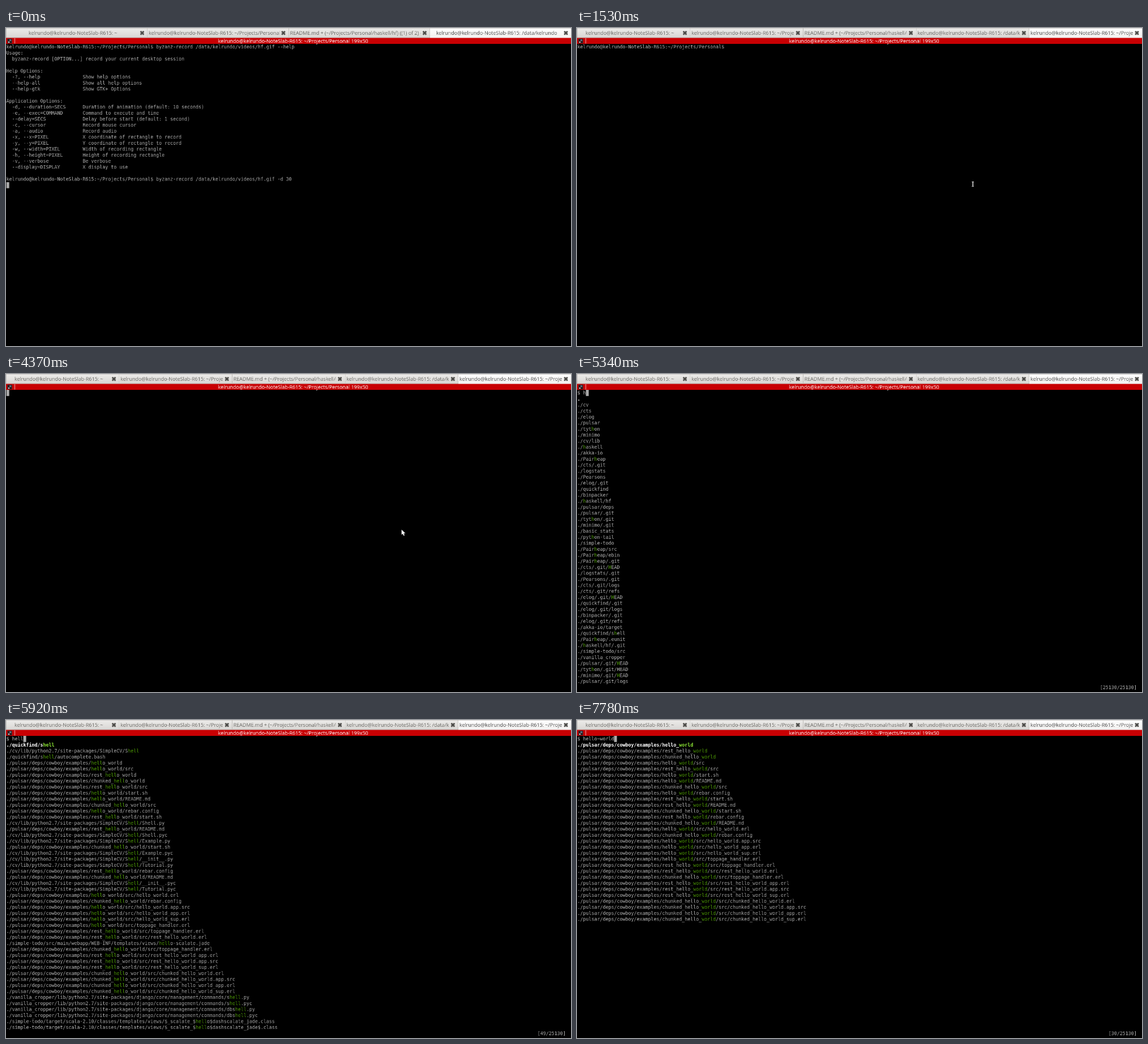
An HTML page with a canvas that plays this animation: 998x561 px, repeating every 8 s.

```html
<!DOCTYPE html>
<html lang="en">
<head>
<meta charset="utf-8">
<title>Terminal fuzzy finder</title>
<style>
  html, body { margin: 0; width: 100%; height: 100%; overflow: hidden; background: #000; }
  canvas { display: block; }
</style>
</head>
<body>
<canvas id="stage" width="998" height="561"></canvas>
<script>
const LOOP = 8000;
const SCALE = 998 / 1600;
const CELL_W = 8, CELL_H = 17, TERM_X = 1, TERM_Y = 45, COLS = 198;
const MONO = '13.33px "DejaVu Sans Mono", monospace';
const UI = '14.3px "Open Sans", sans-serif';
const GREY = '#aaaaaa', GREEN = '#4e9a06', LIME = '#8ae234', RED = '#c80003';

const view = document.getElementById('stage').getContext('2d');
const desk = document.createElement('canvas');
desk.width = 1600;
desk.height = 900;
const ctx = desk.getContext('2d');

const host = 'kelrundo@kelrundo-NoteSlab-R615:';
const prompt = host + '~/Projects/Personal$ ';
const record = prompt + 'byzanz-record /data/kelrundo/videos/hf.gif ';

const tabNames = [
  host + ' ~',
  host + ' ~/Projects/Personal',
  'README.md + (~/Projects/Personal/haskell/hf) ((1) of 2) - VIM',
  host + ' /data/kelrundo',
  host + ' ~/Projects/Personal'
];

const option = (flag, text) => ('  ' + flag).padEnd(27) + text;
const helpText = [
  record + '--help',
  'Usage:',
  '  byzanz-record [OPTION...] record your current desktop session',
  '',
  'Help Options:',
  option('-?, --help', 'Show help options'),
  option('--help-all', 'Show all help options'),
  option('--help-gtk', 'Show GTK+ Options'),
  '',
  'Application Options:',
  option('-d, --duration=SECS', 'Duration of animation (default: 10 seconds)'),
  option('-e, --exec=COMMAND', 'Command to execute and time'),
  option('--delay=SECS', 'Delay before start (default: 1 second)'),
  option('-c, --cursor', 'Record mouse cursor'),
  option('-a, --audio', 'Record audio'),
  option('-x, --x=PIXEL', 'X coordinate of rectangle to record'),
  option('-y, --y=PIXEL', 'Y coordinate of rectangle to record'),
  option('-w, --width=PIXEL', 'Width of recording rectangle'),
  option('-h, --height=PIXEL', 'Height of recording rectangle'),
  option('-v, --verbose', 'Be verbose'),
  option('--display=DISPLAY', 'X display to use'),
  '',
  record + '-d 30'
];

// Shorthand in the path lists: @ # % * ^ stand for common path parts.
const shorthand = {
  '@': 'pulsar/deps/cowboy/examples/',
  '#': 'cv/lib/python2.7/site-packages/SimpleCV/Shell',
  '%': 'vanilla_cropper/lib/python2.7/site-packages/django/core/management/commands/',
  '*': 'hello_world',
  '^': 'Pairheap',
  '!': '/.git/'
};
const paths = text => text.trim().split(/\s+/)
  .map(p => './' + p.replace(/[@#%*^!]/g, c => shorthand[c]));

const heList = paths(`
  ^ ^/src ^/ebin ^/.git cts!HEAD elog!HEAD pulsar/deps/simple_cache quickfind/shell
  ^/.eunit pulsar!HEAD tython!HEAD minimo!HEAD cts!branches elog!branches ^/README.md
  ^!info ^!logs ^!refs ^!HEAD logstats!HEAD Pearsons!HEAD cts!logs/HEAD cts!ORIG_HEAD
  quickfind!HEAD elog!logs/HEAD ^/.gitignore ^!hooks ^!index cts!FETCH_HEAD
  cts!refs/heads binpacker!HEAD elog!refs/heads pulsar/deps/pairheap pulsar!branches
  ^!config tython!branches minimo!branches haskell/hf!HEAD
  akka-io/target/scala-2.10/cache pulsar!logs/HEAD ^!objects ^/rebar.config
  basic_stats!HEAD python-tail!HEAD simple-todo!HEAD pulsar!refs/heads ^!branches
  logstats!branches`);

const hellList = paths(`
  quickfind/shell # quickfind/shell/autocomplete.bash
  @* @*/src @rest_* @chunked_* @rest_*/src @*/start.sh @*/README.md @chunked_*/src
  @*/rebar.config @rest_*/start.sh #/Shell.py @rest_*/README.md #/Shell.pyc
  #/Example.py @chunked_*/start.sh #/Example.pyc #/__init__.py #/Tutorial.py
  @rest_*/rebar.config @chunked_*/README.md #/__init__.pyc #/Tutorial.pyc
  @*/src/*.erl @chunked_*/rebar.config @*/src/*.app.src @*/src/*_app.erl
  @*/src/*_sup.erl @*/src/toppage_handler.erl @rest_*/src/toppage_handler.erl
  @rest_*/src/rest_*.erl
  simple-todo/src/main/webapp/WEB-INF/templates/views/hello-scalate.jade
  @chunked_*/src/toppage_handler.erl @rest_*/src/rest_*_app.erl
  @rest_*/src/rest_*.app.src @rest_*/src/rest_*_sup.erl
  @chunked_*/src/chunked_*.erl @chunked_*/src/chunked_*.app.src
  @chunked_*/src/chunked_*_app.erl @chunked_*/src/chunked_*_sup.erl
  %shell.py %shell.pyc %dbshell.py %dbshell.pyc
  simple-todo/target/scala-2.10/classes/templates/views/$_scalate_$hello$dashscalate_jade.class
  simple-todo/target/scala-2.10/classes/templates/views/$_scalate_$hello$dashscalate_jade$.class
  simple-todo/target/scala-2.10/src_managed/main/scalate/templates/views/hello-scalate_jade.scala`);

const helloList = hellList.filter(p => p.includes('hello'));
const worldList = helloList.filter(p => p.includes('world'));
worldList.splice(3, 0, worldList.splice(1, 1)[0]);

const parents = path => path.split('/').map((_, i, parts) => parts.slice(0, i + 1).join('/'));
const allList = [...new Set([...heList, ...hellList].flatMap(parents))]
  .sort((a, b) => a.length - b.length);
const hList = allList.filter(p => /h/i.test(p));

const scene = (start, props) => ({ start, newTab: true, lines: [], cursor: null, pointer: '', ...props });
const shell = (start, typed, pointer = '', blink = true) => {
  const line = prompt + typed;
  return scene(start, { lines: [line], cursor: blink ? [line.length, 0] : null, pointer });
};
const finder = (start, query, list, count, blink = true, pointer = '') => scene(start, {
  lines: ['$ ' + query], cursor: blink ? [query.length + 2, 0] : null, query, list, count, pointer
});

const command = 'find . | hf';
const keyTimes = [2010, 2090, 2180, 2260, 2420, 2510, 2670, 2930, 3070, 3450, 3550];

const scenes = [
  scene(0, { newTab: false, lines: helpText, cursor: [0, 23] }),
  scene(540, { newTab: false, lines: helpText }),
  scene(950, { cursor: [0, 0], pointer: 'arrow' }),
  scene(1040, { cursor: [0, 0], pointer: 'beam' }),
  shell(1090, '', 'beam'),
  shell(1530, '', 'beam', false),
  ...keyTimes.map((time, i) => shell(time, command.slice(0, i + 1))),
  shell(3700, command + ' '),
  shell(4080, command),
  scene(4290, { lines: [prompt + command], cursor: [0, 1] }),
  scene(4330, { cursor: [0, 0] }),
  scene(4370, { cursor: [0, 0], pointer: 'arrow' }),
  finder(4420, '', allList, 25130, true, 'beam'),
  finder(4830, '', allList, 25130, false, 'beam'),
  finder(5300, 'h', allList, 25130),
  finder(5350, 'h', hList, 1500),
  finder(5430, 'h', hList, 9500),
  finder(5710, 'he', hList, 9500),
  finder(5760, 'he', heList, 1500),
  finder(5810, 'hel', hellList, 57),
  finder(5920, 'hell', hellList, 49),
  finder(6070, 'hello', helloList, 34),
  finder(6590, 'hello', helloList, 34, false),
  finder(6880, 'hello~', helloList, 34),
  finder(7330, 'hello~w', helloList, 34),
  finder(7450, 'hello~wo', worldList, 30),
  finder(7560, 'hello~wor', worldList, 30),
  finder(7670, 'hello~worl', worldList, 30),
  finder(7780, 'hello~world', worldList, 30)
];

function box(x, y, w, h, fill) {
  ctx.fillStyle = fill;
  ctx.fillRect(x, y, w, h);
}

function print(text, col, row, color = GREY, bold = false) {
  ctx.font = (bold ? 'bold ' : '') + MONO;
  ctx.textAlign = 'left';
  ctx.fillStyle = color;
  [...text].forEach((char, i) => {
    if (char !== ' ') ctx.fillText(char, TERM_X + (col + i) * CELL_W, TERM_Y + row * CELL_H + 13);
  });
}

function shade(top, bottom) {
  const fill = ctx.createLinearGradient(0, 0, 0, 27);
  fill.addColorStop(0, top);
  fill.addColorStop(1, bottom);
  return fill;
}

function drawTab(name, x, width, active) {
  box(x, 0, width, 28, active ? shade('#ffffff', '#f2f1f0') : shade('#edecea', '#d9d7d4'));
  box(x, 0, width, 1, '#c4c1bd');
  box(x, 1, 1, 27, '#bcb9b5');
  if (!active) box(x, 26, width, 2, '#c6c3bf');

  const left = x + 4, room = width - 29;
  ctx.save();
  ctx.beginPath();
  ctx.rect(left, 0, room, 28);
  ctx.clip();
  ctx.font = UI;
  ctx.fillStyle = active ? '#4c4c4c' : '#686763';
  const fits = ctx.measureText(name).width < room;
  ctx.textAlign = fits ? 'center' : 'left';
  ctx.fillText(name, fits ? left + room / 2 : left, 18.5);
  ctx.restore();

  const cx = x + width - 14.5, cy = 14, r = 4.6;
  ctx.strokeStyle = '#4e4d4a';
  ctx.lineWidth = 4.4;
  ctx.beginPath();
  ctx.moveTo(cx - r, cy - r);
  ctx.lineTo(cx + r, cy + r);
  ctx.moveTo(cx + r, cy - r);
  ctx.lineTo(cx - r, cy + r);
  ctx.stroke();
}

function drawChrome(newTab) {
  const names = newTab ? tabNames : tabNames.slice(0, 4);
  const width = 1600 / names.length;
  names.forEach((name, i) => drawTab(name, i * width, width, i === names.length - 1));

  box(0, 28, 1600, 17, RED);
  box(4, 30, 13, 13, '#2b2023');
  box(10, 32, 5, 5, '#5a7183');
  box(6, 38, 4, 4, '#d8d0d0');
  box(24, 29, 2, 15, '#e89a9a');
  ctx.font = UI;
  ctx.textAlign = 'center';
  ctx.fillStyle = '#ffffff';
  ctx.fillText(host + ' ~/Projects/Personal 199x50', 813, 41.5);
}

function drawResults({ query, list, count }) {
  const term = query.split('~').filter(Boolean).pop() || '';
  list.slice(0, 48).forEach((path, i) => {
    const bold = i === 0;
    const at = term ? path.toLowerCase().indexOf(term) : -1;
    const from = at < 0 ? path.length : at;
    const to = from + term.length;
    const color = bold ? '#ffffff' : GREY;
    print(path.slice(0, from), 0, i + 1, color, bold);
    print(path.slice(from, to), from, i + 1, bold ? LIME : GREEN, bold);
    print(path.slice(to), to, i + 1, color, bold);
  });
  const label = `[${count}/25130]`;
  print(label, COLS - label.length, 49);
}

function drawPointer(kind) {
  if (kind === 'beam') {
    box(1120, 435, 2, 13, '#ffffff');
    box(1118, 434, 6, 1.5, '#ffffff');
    box(1118, 447, 6, 1.5, '#ffffff');
  } else if (kind === 'arrow') {
    ctx.fillStyle = '#ffffff';
    ctx.fill(new Path2D('M1120 440 v15 l3.5 -3.2 l2.6 5.6 l2.6 -1.2 l-2.5 -5.4 h4.8 z'));
  }
}

function draw(now) {
  box(0, 0, 1600, 900, '#000000');
  drawChrome(now.newTab);
  now.lines.forEach((line, row) => print(line, 0, row));
  if (now.list) drawResults(now);
  if (now.cursor) {
    const [col, row] = now.cursor;
    box(TERM_X + col * CELL_W, TERM_Y + row * CELL_H, CELL_W, CELL_H, GREY);
  }
  drawPointer(now.pointer);
  view.drawImage(desk, 0, 0, 1600 * SCALE, 900 * SCALE);
}

let shown = null;
function tick() {
  const time = performance.now() % LOOP;
  const now = scenes.findLast(s => s.start <= time);
  if (now !== shown) draw(shown = now);
  requestAnimationFrame(tick);
}
tick();
</script>
</body>
</html>
```
